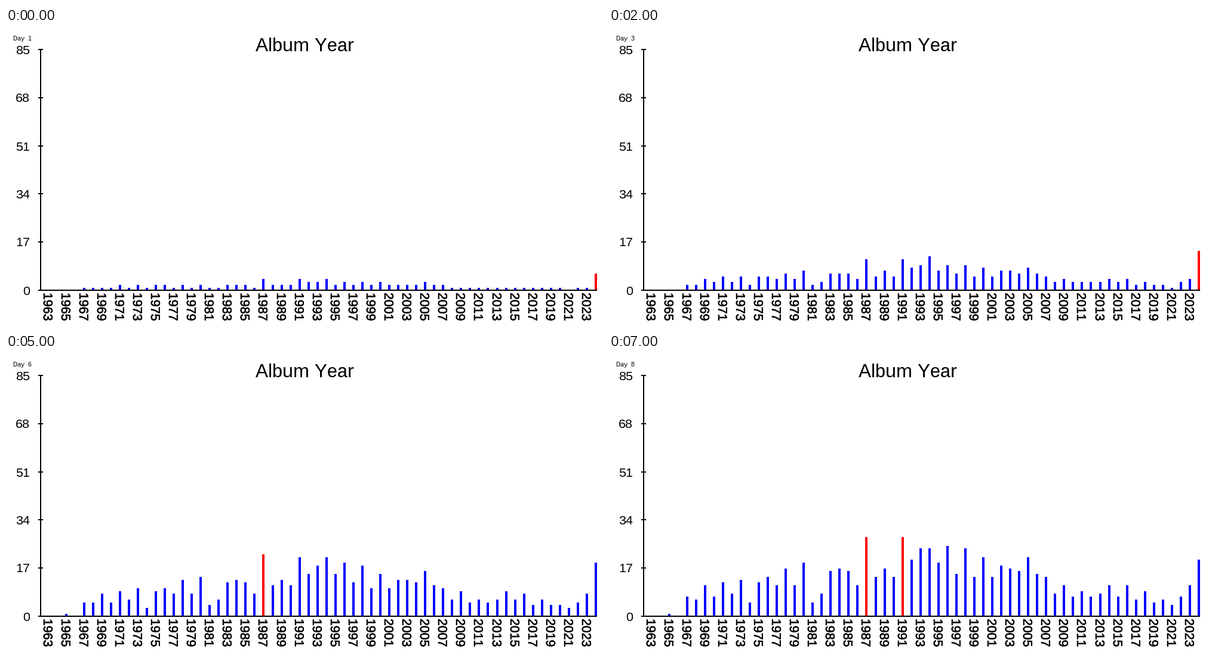
Recreate the animation shown at these times as a matplotlib script. Size 1000x500 px, loop 8 s.

```python
import numpy as np
import matplotlib.pyplot as plt
from matplotlib.animation import FuncAnimation
from matplotlib.patches import Rectangle
from matplotlib.patheffects import withStroke

WIDTH, HEIGHT = 1000, 500
DAYS = 8
FIRST_YEAR, LAST_YEAR = 1963, 2024
AXIS_X, AXIS_Y = 58, 440
UNIT = 4.75          # pixels per album
STEP = 15.04         # pixels per year

plt.rcParams.update({
    "font.family": "Liberation Sans",
    "text.kerning_factor": 6,    # plain advances, no pair kerning
    "text.hinting": "native",
    "text.hinting_factor": 1,
})

# Turning points of the final totals.
TREND = [(1964, 0), (1965, 1), (1966, 0), (1967, 6), (1969, 9), (1973, 11),
         (1974, 5), (1975, 12), (1980, 15), (1981, 7), (1982, 7), (1983, 18),
         (1986, 13), (1987, 23.4), (1989, 14), (1991, 23.5), (1994, 23),
         (2001, 16), (2006, 19), (2007, 11), (2012, 7), (2014, 10), (2018, 7),
         (2021, 4), (2023, 10), (2024, 24.6)]

# Years heard early on: 1 is a steady pace, higher slows down towards the end.
PACE = {1987: 1.08, 1994: 1.55, 2024: 2.5}

YEARS = np.arange(FIRST_YEAR, LAST_YEAR + 1)


def final_totals():
    """Trend with an alternating ripple whose phase drifts over the years."""
    parity = np.where(YEARS % 2, -1, 1)
    ripple = 0.25 * parity * np.sin(np.pi * (YEARS - 1975) / 9.3)
    return np.interp(YEARS, *zip(*TREND)) * (1 + ripple)


TOTALS = final_totals()
PACES = np.array([PACE.get(year, 1) for year in YEARS])


def counts_on(day):
    progress = 1 - (1 - day / DAYS) ** PACES
    return np.floor(TOTALS * progress + 0.5).astype(int)


def year_x(year):
    return int(71 + STEP * (year - FIRST_YEAR))


fig = plt.figure(figsize=(WIDTH / 72, HEIGHT / 72), dpi=72, facecolor="white")
ax = fig.add_axes([0, 0, 1, 1])
ax.set(xlim=(0, WIDTH), ylim=(HEIGHT, 0))
ax.axis("off")


def box(x, y, width, height, color="black", z=2):
    patch = Rectangle((x, y), width, height, facecolor=color,
                      linewidth=0, antialiased=False, zorder=z)
    return ax.add_patch(patch)


def draw_axes():
    box(AXIS_X - 1, 36, 2, AXIS_Y - 36)
    box(AXIS_X - 1, AXIS_Y - 1, 991 - AXIS_X, 2, z=3)
    for value in range(0, 86, 17):
        y = round(AXIS_Y - UNIT * value)
        box(AXIS_X - 4, y - 1, 8, 2)
        ax.text(40, y + 7.5, str(value), size=21.33, ha="right", va="baseline")
    for year in range(FIRST_YEAR, LAST_YEAR, 2):
        ax.text(year_x(year) - 8, 444, str(year), size=21.33, rotation=270,
                rotation_mode="anchor", ha="left", va="baseline",
                path_effects=[withStroke(linewidth=0.6, foreground="black")])
    ax.text(500.5, 39, "Album Year", size=32, ha="center", va="baseline")


draw_axes()
day_label = ax.text(11.5, 21, "", size=10.67, va="baseline")
bars = [box(year_x(year) - 2, AXIS_Y, 4, 0) for year in YEARS]


def update(frame):
    counts = counts_on(frame + 1)
    leader = counts.max()
    for bar, count in zip(bars, counts):
        height = int(UNIT * count)
        bar.set_y(AXIS_Y - height)
        bar.set_height(height)
        bar.set_facecolor("red" if count == leader else "blue")
    day_label.set_text(f"Day  {frame + 1}")
    return [*bars, day_label]


anim = FuncAnimation(fig, update, frames=DAYS, interval=1000, repeat=True)
plt.show()
```
